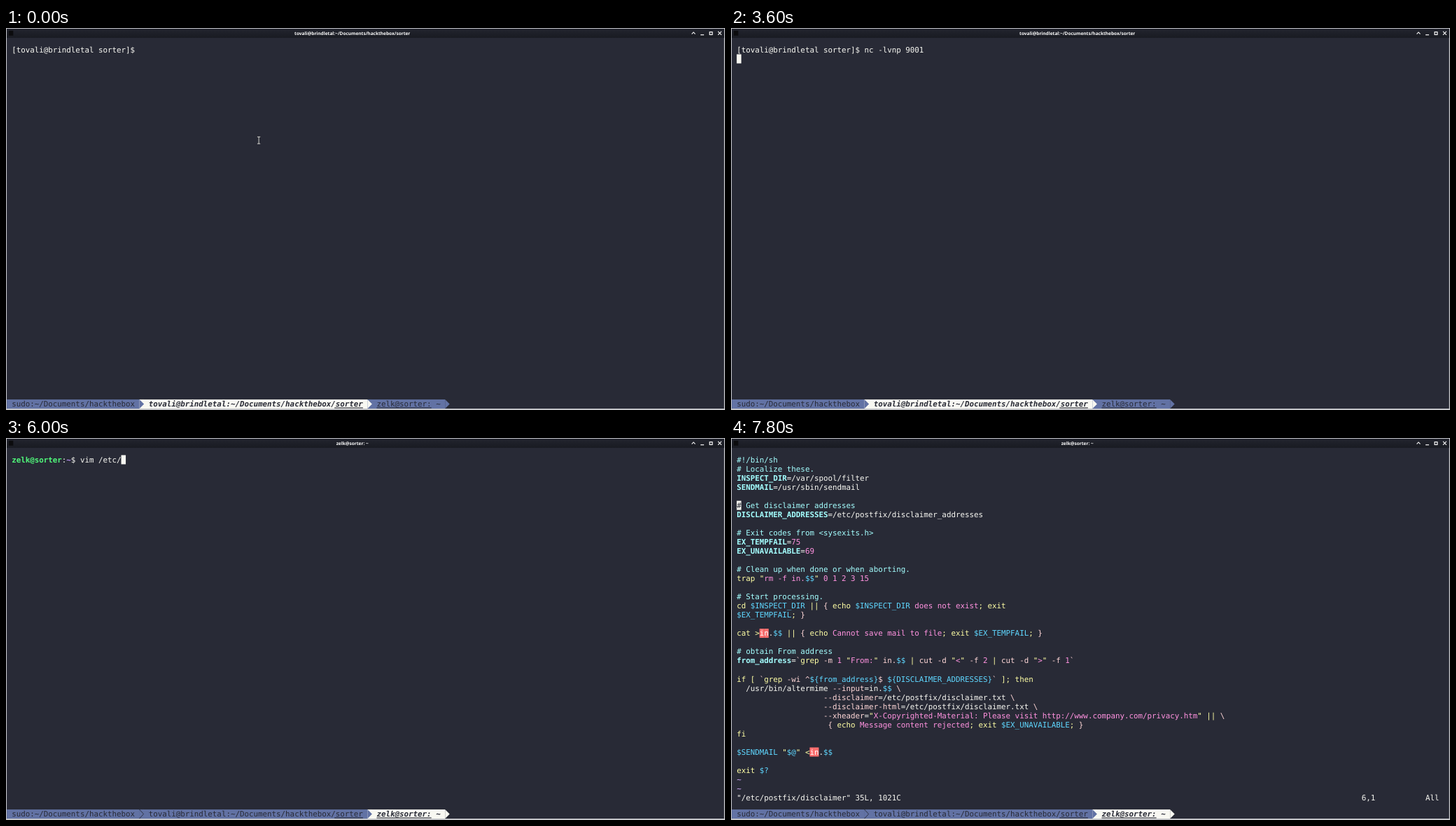
An HTML page with a canvas for the animation above (8000 ms loop, 1027x545 px).

```html
<!DOCTYPE html>
<html lang="en">
<head>
<meta charset="utf-8">
<title>Terminal session</title>
<style>
  html, body { margin: 0; width: 100%; height: 100%; overflow: hidden; background: #282a36; }
  canvas { display: block; }
</style>
</head>
<body>
<canvas id="stage" width="1027" height="545"></canvas>
<script>
const ctx = document.getElementById('stage').getContext('2d');
const SCALE = 0.543, CELL_W = 12, CELL_H = 24, LEFT = 15, TOP = 45, TAB_TOP = 976;
const LOOP = 8000, SWITCH = 4300, VIM_OPEN = 7800;
const BG = '#282a36', FG = '#f8f8f2', BLUE = '#6272a4';
const MONO = '20px "DejaVu Sans Mono", monospace';

// Markup: % and a key switch the style of the text after it.
const STYLES = {
  w: { color: FG },
  c: { color: '#a4ffff' },
  b: { color: '#a4ffff', font: 'bold ' },
  m: { color: '#ff92df' },
  y: { color: '#ffffa5' },
  p: { color: '#5fd7ff' },
  s: { color: '#ffd7d7' },
  n: { color: '#d6acff' },
  e: { color: '#ffffff', back: '#ff6e6e' },
  g: { color: '#50fa7b', font: 'bold ' },
  v: { color: '#bd93f9', font: 'bold ' },
  d: { color: BG },
  i: { color: BG, font: 'italic bold ' },
};

const TABS = [
  { text: 'sudo:~/Documents/hackthebox', col: 0 },
  { text: 'tovali@brindletal:~/Documents/hackthebox/sorter', col: 30 },
  { text: 'zelk@sorter: ~', col: 80 },
];

// Steps: time, then number of characters typed so far.
const SHELLS = [
  {
    title: TABS[1].text, tab: 1,
    prompt: '[tovali@brindletal sorter]$ ', width: 28, command: 'nc -lvnp 9001',
    steps: [[500, 1], [700, 2], [800, 3], [1000, 4], [1300, 5], [1900, 6], [2000, 7],
            [2200, 8], [2400, 9], [2600, 10], [2900, 13]],
  },
  {
    title: TABS[2].text, tab: 2,
    prompt: '%gzelk@sorter%w:%v~%w$ ', width: 15, command: 'vim /etc/postfix/disclaimer',
    steps: [[5100, 2], [5300, 4], [5600, 5], [5800, 8], [6000, 9], [6300, 12],
            [6500, 17], [7100, 20], [7300, 27]],
  },
];

const INDENT = ' '.repeat(19);
const FILE = [
  '%c#!/bin/sh',
  '%c# Localize these.',
  '%bINSPECT_DIR%w=/var/spool/filter',
  '%bSENDMAIL%w=/usr/sbin/sendmail',
  '',
  '%c# Get disclaimer addresses',
  '%bDISCLAIMER_ADDRESSES%w=/etc/postfix/disclaimer_addresses',
  '',
  '%c# Exit codes from <sysexits.h>',
  '%bEX_TEMPFAIL%w=%m75',
  '%bEX_UNAVAILABLE%w=%m69',
  '',
  '%c# Clean up when done or when aborting.',
  '%ytrap "%mrm -f in.%p$$%y" %m0 1 2 3 15',
  '',
  '%c# Start processing.',
  '%ycd %p$INSPECT_DIR %y|| %s{ %yecho %p$INSPECT_DIR%m does not exist%y; exit',
  '%p$EX_TEMPFAIL%y; %s}',
  '',
  '%ycat >%ein%w.%p$$ %y|| %s{ %yecho%m Cannot save mail to file%y; exit %p$EX_TEMPFAIL%y; %s}',
  '',
  '%c# obtain From address',
  '%bfrom_address%w=%s`%ygrep%s -m %m1 %y"%mFrom:%y"%s in.%p$$ %y|%s cut -d %y"%m<%y"%s -f %m2 %y|%s cut -d %y"%m>%y"%s -f %m1%s`',
  '',
  '%yif [ %s`%ygrep%s -wi ^%p${from_address}%s$ %p${DISCLAIMER_ADDRESSES}%s` %y]; then',
  '  /usr/bin/altermime%s --input%w=in.%p$$%s \\',
  INDENT + '%s--disclaimer%w=/etc/postfix/disclaimer.txt%s \\',
  INDENT + '%s--disclaimer-html%w=/etc/postfix/disclaimer.txt%s \\',
  INDENT + '%s--xheader%w=%y"%mX-Copyrighted-Material: Please visit http://www.company.com/privacy.htm%y" ||%s \\',
  INDENT + ' %s{ %yecho%m Message content rejected%y; exit %p$EX_UNAVAILABLE%y; %s}',
  '%yfi',
  '',
  '%p$SENDMAIL %y"%p$@%y" <%ein%w.%p$$',
  '',
  '%yexit %p$?',
  '%n~',
  '%n~',
  '"/etc/postfix/disclaimer" 35L, 1021C',
];

const colX = col => LEFT + col * CELL_W;
const rowY = row => TOP + row * CELL_H;

function rect(x, y, w, h, color) {
  ctx.fillStyle = color;
  ctx.fillRect(x, y, w, h);
}

function line(points, color, width) {
  ctx.beginPath();
  points.forEach(([x, y]) => ctx.lineTo(x, y));
  ctx.strokeStyle = color;
  ctx.lineWidth = width;
  ctx.stroke();
}

// Writes marked-up text on the character grid.
function write(text, col, y, key = 'w') {
  let style = STYLES[key];
  for (let i = 0; i < text.length; i++) {
    if (text[i] === '%') {
      style = STYLES[text[++i]];
      continue;
    }
    const x = colX(col++);
    if (style.back) rect(x, y, CELL_W, CELL_H, style.back);
    ctx.font = (style.font || '') + MONO;
    ctx.fillStyle = style.color;
    ctx.fillText(text[i], x, y + 19);
  }
}

function cursor(col, row) {
  rect(colX(col), rowY(row), CELL_W, CELL_H, FG);
}

function drawWindow(title) {
  rect(0, 0, 1892, 1004, '#c4c5c9');
  rect(2, 2, 1887, 998, BG);
  const bar = ctx.createLinearGradient(0, 2, 0, 26);
  bar.addColorStop(0, '#22242e');
  bar.addColorStop(1, '#191b22');
  rect(2, 2, 1887, 24, bar);
  rect(7, 7, 12, 13, '#0c0c0e');

  ctx.font = 'bold 12px "Noto Sans", sans-serif';
  ctx.fillStyle = '#ffffff';
  ctx.textAlign = 'center';
  ctx.fillText(title, 911, 18);
  ctx.textAlign = 'left';

  line([[1804, 16], [1808.5, 11], [1813, 16]], '#fff', 2);
  line([[1827, 18], [1836, 18]], '#fff', 2.2);
  ctx.strokeRect(1851, 10.5, 7, 7);
  line([[1873, 9], [1882, 18]], '#fff', 2);
  line([[1882, 9], [1873, 18]], '#fff', 2);
}

function drawTabs(active) {
  const ends = TABS.map(tab => colX(tab.col + tab.text.length + 1));
  const color = i => i === active ? FG : BLUE;
  TABS.forEach((tab, i) => {
    const start = i ? ends[i - 1] : 2, end = ends[i], tip = end + CELL_W;
    rect(start, TAB_TOP, end - start, CELL_H, color(i));
    rect(end, TAB_TOP, CELL_W, CELL_H, i < 2 ? color(i + 1) : BG);
    ctx.beginPath();
    ctx.moveTo(end, TAB_TOP);
    ctx.lineTo(tip, TAB_TOP + 12);
    ctx.lineTo(end, TAB_TOP + 24);
    ctx.fillStyle = color(i);
    ctx.fill();
    if (i < 2 && color(i) === color(i + 1)) {
      line([[end, TAB_TOP], [tip - 1, TAB_TOP + 12], [end, TAB_TOP + 24]], BG, 1.6);
    }
  });
  // The rectangle of each tab starts at the previous arrow, so labels go last.
  TABS.forEach((tab, i) => {
    const start = i ? ends[i - 1] : 2;
    if (i) {
      ctx.beginPath();
      ctx.moveTo(start, TAB_TOP);
      ctx.lineTo(start + CELL_W, TAB_TOP + 12);
      ctx.lineTo(start, TAB_TOP + 24);
      ctx.fillStyle = color(i - 1);
      ctx.fill();
      if (color(i) === color(i - 1)) {
        line([[start, TAB_TOP], [start + 11, TAB_TOP + 12], [start, TAB_TOP + 24]], BG, 1.6);
      }
    }
    write(tab.text, tab.col, TAB_TOP, i === active ? 'i' : 'd');
  });
  rect(864, 997, 75, 2, BG);
  rect(colX(80), 997, 12 * CELL_W, 2, BG);
}

function drawPointer(x, y) {
  const stem = [[x, y - 9], [x, y + 9]];
  const caps = [-9, 9].map(d => [[x - 4, y + d], [x + 4, y + d]]);
  [['#15161c', 4], ['#e8e8e8', 1.8]].forEach(([color, width]) =>
    [stem, ...caps].forEach(points => line(points, color, width)));
}

function drawShell(shell, t) {
  const step = shell.steps.filter(([time]) => time <= t).pop();
  const typed = step ? step[1] : 0;
  write(shell.prompt + '%w' + shell.command.slice(0, typed), 0, TOP);
  if (t >= 3600 && t < SWITCH) cursor(0, 1);
  else if (t >= 300) cursor(shell.width + typed, 0);
  else drawPointer(665, 295);
}

function drawVim() {
  FILE.forEach((text, row) => write(text, 0, rowY(row)));
  write('6,1', 137, rowY(37));
  write('All', 151, rowY(37));
  cursor(0, 5);
  write('#', 0, rowY(5), 'd');
}

function draw(t) {
  const shell = SHELLS[t < SWITCH ? 0 : 1];
  ctx.setTransform(SCALE, 0, 0, SCALE, 0, 0);
  ctx.textRendering = 'geometricPrecision';
  drawWindow(shell.title);
  if (t < VIM_OPEN) drawShell(shell, t);
  else drawVim();
  drawTabs(shell.tab);
}

const origin = performance.now();
function tick() {
  draw((performance.now() - origin) % LOOP);
  requestAnimationFrame(tick);
}
tick();
</script>
</body>
</html>
```
